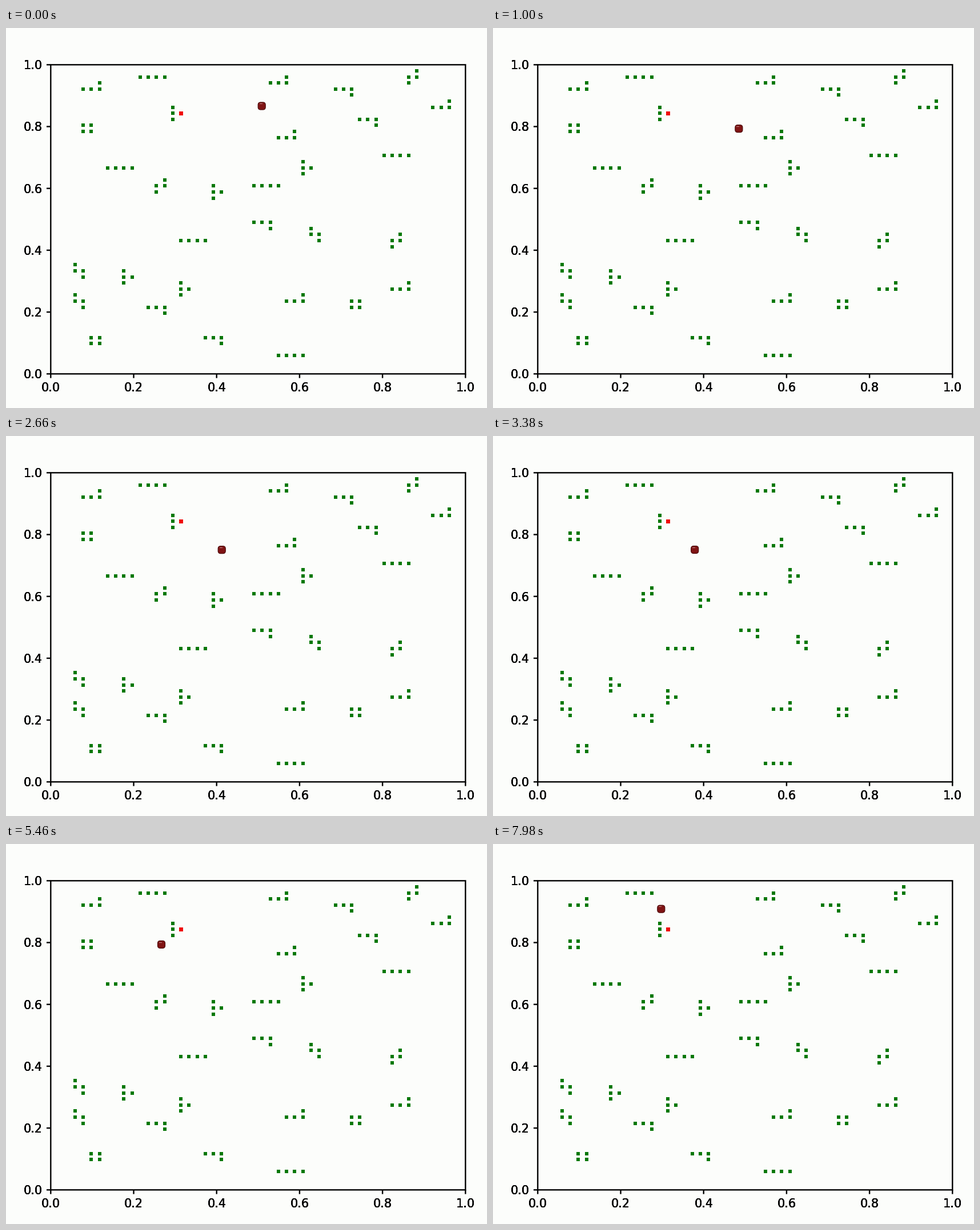
A matplotlib script for the animation above (8 s loop, 842 by 665 pixels).

```python
import numpy as np
import matplotlib.pyplot as plt
from matplotlib.animation import FuncAnimation
from matplotlib.patches import FancyBboxPatch, Rectangle

W, H, DPI = 842, 665, 100
PT = 72 / DPI  # points per pixel
LEFT, RIGHT, TOP, BOTTOM = 78.3, 804.3, 64.3, 605.3
CELLS = 51
INTERVAL, DURATION = 20, 8000

# Each obstacle kind is a walk over the grid, placed at its starting cells
MOVES = {"R": (1, 0), "L": (-1, 0), "U": (0, 1), "D": (0, -1)}
OBSTACLES = {
    "RRR": [(11, 49), (41, 36), (7, 34), (25, 31), (16, 22), (28, 3)],
    "RUL": [(4, 40), (37, 11), (5, 5)],
    "URLU": [(15, 42), (31, 33), (20, 29), (9, 15), (16, 13)],
    "RRU": [(4, 47), (27, 48), (47, 44), (28, 39), (42, 14), (29, 12)],
    "RRD": [(35, 47), (38, 42), (25, 25), (12, 11), (19, 6)],
    "URU": [(44, 48), (13, 30), (42, 21)],
    "DRD": [(32, 24), (3, 18), (3, 13)],
}
GOAL = (16, 43)

# The robot curves in through a few points, then circles the goal
ORBIT_START, ORBIT_RADIUS = 102, 0.068
APPROACH_STEPS = [1, 11, 38, 74, ORBIT_START]
APPROACH = np.polyfit(
    APPROACH_STEPS,
    [(447.5, 136.3), (443, 157.5), (408.5, 190.5), (353, 198.8), (299.2, 185)], 4)
STALLS = [(6140, 6560), (6700, 7120), (7300, 7840)]


def to_pixels(x, y):
    return LEFT + x * (RIGHT - LEFT), BOTTOM - y * (BOTTOM - TOP)


def walk(start, moves):
    cells = [start]
    for move in moves:
        dx, dy = MOVES[move]
        cells.append((cells[-1][0] + dx, cells[-1][1] + dy))
    return cells


def step_at(t):
    """Three quick steps 20 ms apart, then a rest, every 140 ms."""
    for start, end in STALLS:
        if start <= t < end:
            t = start
    group, phase = divmod(t + 20, 140)
    return 3 * group + min(2, phase // 20)


def robot_position(step):
    if step < ORBIT_START:
        return np.polyval(APPROACH[:, 0], step), np.polyval(APPROACH[:, 1], step)
    angle = np.radians(-97.8 - 2.26 * (step - ORBIT_START))
    return to_pixels(GOAL[0] / CELLS + ORBIT_RADIUS * np.cos(angle),
                     GOAL[1] / CELLS + ORBIT_RADIUS * np.sin(angle))


fig = plt.figure(figsize=(W / DPI, H / DPI), dpi=DPI, facecolor="#fcfdfb")
ax = fig.add_axes([0, 0, 1, 1])
ax.set_xlim(0, W)
ax.set_ylim(H, 0)
ax.axis("off")


def draw_axes():
    line = dict(color="black", lw=2.4 * PT, snap=False, solid_capstyle="butt")
    ax.add_patch(Rectangle((LEFT, TOP), RIGHT - LEFT, BOTTOM - TOP, fill=False,
                           ec="black", lw=2.4 * PT, snap=False))
    style = dict(family="DejaVu Sans", size=20.83 * PT, color="black")
    for value in np.linspace(0, 1, 6):
        x, y = to_pixels(value, value)
        ax.plot([x, x], [BOTTOM, BOTTOM + 7.3], **line)
        ax.plot([LEFT - 7.3, LEFT], [y, y], **line)
        label = f"{value:.1f}"
        for _ in range(4):  # overprinting gives heavier glyph edges
            ax.text(x, BOTTOM + 14.6, label, ha="center", va="top", **style)
            ax.text(LEFT - 14.6, y, label, ha="right", va="center_baseline", **style)


def draw_cells(cells, color, size):
    x, y = to_pixels(*(np.array(cells).T / CELLS))
    ax.plot(x, y, "s", color=color, ms=size * PT, mew=0)


draw_axes()
draw_cells([cell for moves, starts in OBSTACLES.items()
            for start in starts for cell in walk(start, moves)], "#067806", 6)
draw_cells([GOAL], "#f00a0a", 7)

body = FancyBboxPatch((0, 0), 13, 13, boxstyle="round,pad=0,rounding_size=4.5",
                      fc="#801414", ec="#4c0a0a", lw=1.2 * PT, zorder=5)
ax.add_patch(body)
glint, = ax.plot([], [], color="#c08888", lw=1 * PT, zorder=6)


def update(frame):
    x, y = robot_position(step_at(frame * INTERVAL))
    body.set_x(x - 6.3)
    body.set_y(y - 6.3)
    glint.set_data([x - 4, x], [y - 4, y - 4])
    return body, glint


anim = FuncAnimation(fig, update, frames=DURATION // INTERVAL, interval=INTERVAL,
                     repeat=True, repeat_delay=0, blit=False)
plt.show()
```
